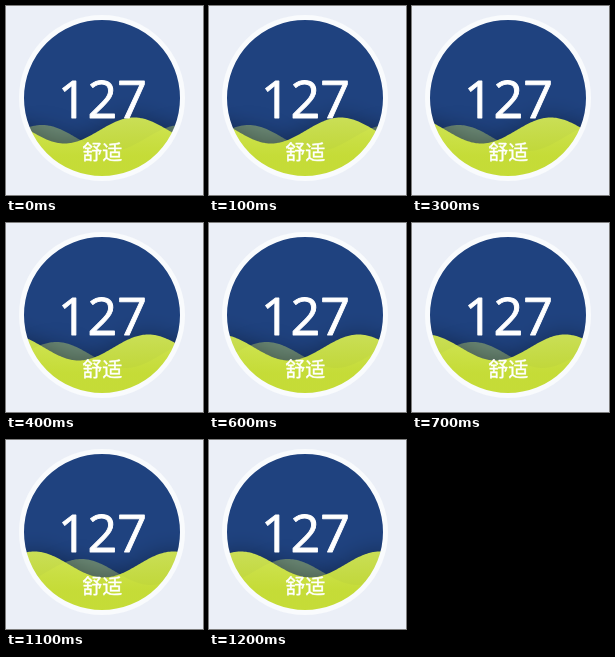
These frames come from a looping animation (197x189 px, 1300 ms). An HTML page with a canvas:

```html
<!DOCTYPE html>
<html lang="zh-CN">
<head>
<meta charset="utf-8">
<style>
html, body { margin: 0; width: 100%; height: 100%; overflow: hidden; background: #ebeff7; }
canvas { display: block; width: 197px; height: 189px; }
</style>
</head>
<body>
<canvas id="stage"></canvas>
<script>
const W = 197, H = 189, LOOP = 1300, STEP = 100;
const CX = 96, CY = 92, R = 78, RING = 5;
const WAVELENGTH = 139, AMPLITUDE = 13, SPEED = 0.0357;

const canvas = document.getElementById('stage');
const ctx = canvas.getContext('2d');
const dpr = window.devicePixelRatio || 1;
canvas.width = W * dpr;
canvas.height = H * dpr;
ctx.scale(dpr, dpr);

const lime = ctx.createLinearGradient(0, 111, 0, 150);
lime.addColorStop(0, 'rgba(221,241,84,0.9)');
lime.addColorStop(1, 'rgba(211,234,53,0.9)');

function circle(r) {
  ctx.beginPath();
  ctx.arc(CX, CY, r, 0, Math.PI * 2);
}

function wave(crest, level, color, shadow) {
  ctx.save();
  ctx.beginPath();
  ctx.moveTo(-40, H + 40);
  for (let x = -40; x <= W + 40; x++) {
    ctx.lineTo(x, level - AMPLITUDE * Math.cos((x - crest) / WAVELENGTH * Math.PI * 2));
  }
  ctx.lineTo(W + 40, H + 40);
  ctx.closePath();
  ctx.shadowColor = shadow;
  ctx.shadowBlur = 22 * dpr;
  ctx.fillStyle = color;
  ctx.fill();
  ctx.restore();
}

function label(text, y, font, weight) {
  ctx.font = font;
  ctx.fillStyle = ctx.strokeStyle = '#fff';
  ctx.lineWidth = weight;
  ctx.lineJoin = 'round';
  ctx.textAlign = 'center';
  ctx.textBaseline = 'alphabetic';
  ctx.fillText(text, CX + 0.3, y);
  ctx.strokeText(text, CX + 0.3, y);
}

function draw(t) {
  const shift = t * SPEED;
  ctx.fillStyle = '#ebeff7';
  ctx.fillRect(0, 0, W, H);

  ctx.save();
  circle(R + 1);
  ctx.clip();
  ctx.fillStyle = '#1f427f';
  ctx.fillRect(0, 0, W, H);
  wave(36 + shift, 132, 'rgba(180,205,112,0.5)', 'rgba(0,0,0,0.3)');
  wave(128 + shift, 124.5, lime, 'rgba(0,0,0,0.36)');
  ctx.restore();

  circle(R + RING / 2);
  ctx.strokeStyle = '#f9fbfd';
  ctx.lineWidth = RING;
  ctx.stroke();

  label('127', 111.7, '52px "Open Sans", "Noto Sans", sans-serif', 0.9);
  label('舒适', 153.5, '20px "Noto Sans CJK SC", "Noto Sans CJK", sans-serif', 0.4);
}

function tick() {
  const t = performance.now() % LOOP;
  draw(Math.floor(t / STEP) * STEP);
  requestAnimationFrame(tick);
}
tick();
</script>
</body>
</html>
```
